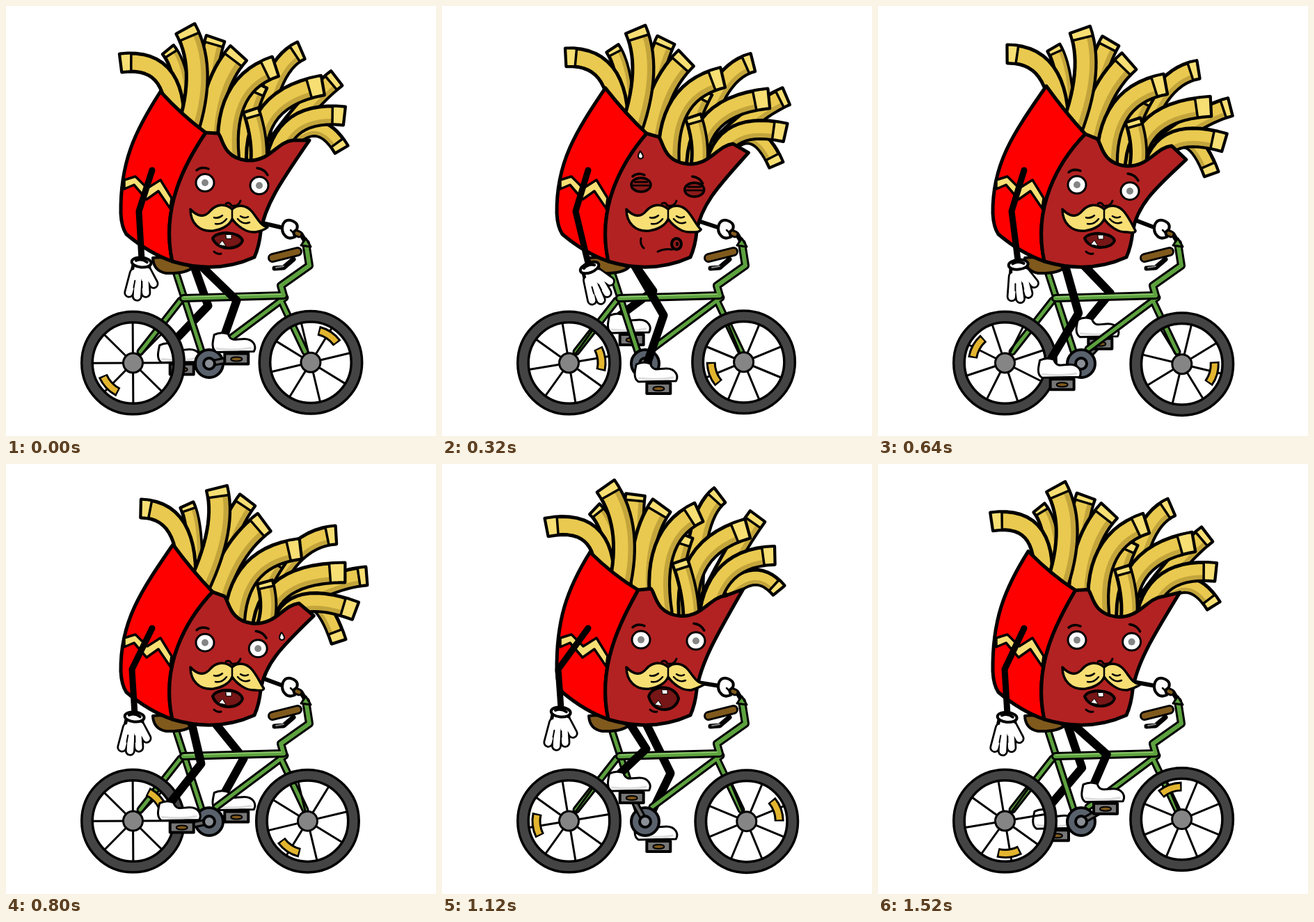
Recreate the animation shown at these times as an HTML page with a canvas. Size 618 by 618 pixels, loop 1600 ms.

```html
<!DOCTYPE html>
<html lang="en">
<head>
<meta charset="utf-8">
<title>Fries on a bike</title>
<style>
html, body { margin: 0; width: 100%; height: 100%; overflow: hidden; background: #fff; }
canvas { display: block; }
</style>
</head>
<body>
<canvas id="stage" width="618" height="618"></canvas>
<script>
const c = document.getElementById('stage').getContext('2d');
const LOOP = 1600, STEP = 80, TAU = Math.PI * 2;
const INK = '#000', GREEN = '#5da23f', BROWN = '#80591c', RED = '#f00', DARK_RED = '#b22222';
const YELLOW = '#e9c94f', PALE = '#f7df74', SHADE = '#c3a53c';

// Key poses, joined by a smooth closed curve
const KEYS = [0, 160, 480, 800, 960, 1280, 1520];
const LEAN = [0, 6, 18, 18, 5, -19, -6];
const SWAY = [0, .55, .35, 1, .13, -.85, -.05];
const WRIST = [195, 203, 213, 185, 172, 174, 186];
const MOUTH = [10, 8, 8, 11, 13, 15, 10];

function pose(values, t) {
  const n = KEYS.length;
  const x = k => KEYS[(k + n) % n] + LOOP * Math.floor(k / n);
  const y = k => values[(k + n) % n];
  const slope = k => (y(k + 1) - y(k - 1)) / (x(k + 1) - x(k - 1));
  let i = n - 1;
  while (KEYS[i] > t) i--;
  const h = x(i + 1) - x(i), u = (t - x(i)) / h, v = 1 - u;
  return v * v * (1 + 2 * u) * y(i) + u * u * (3 - 2 * u) * y(i + 1)
    + h * u * v * (v * slope(i) - u * slope(i + 1));
}

function shape(d, fill, width = 4, ink = INK) {
  const p = new Path2D(d);
  if (fill) { c.fillStyle = fill; c.fill(p); }
  if (width) { c.lineWidth = width; c.strokeStyle = ink; c.stroke(p); }
}
const line = (d, width = 4, ink = INK) => shape(d, null, width, ink);

function tube(d, color, width, edge = 3) {
  line(d, width + edge * 2);
  line(d, width, color);
}

function oval(x, y, rx, ry, fill, width = 3) {
  c.beginPath();
  c.ellipse(x, y, rx, ry, 0, 0, TAU);
  if (fill) { c.fillStyle = fill; c.fill(); }
  if (width) { c.lineWidth = width; c.strokeStyle = INK; c.stroke(); }
}

function at(x, y, angle, paint) {
  c.save();
  c.translate(x, y);
  c.rotate(angle);
  paint();
  c.restore();
}

// Back to front: base, bend, tip, tip travel at full sway, width
const FRIES = [
  [256, 165, 255, 90, 233, 63, 27, -4, 20],
  [282, 175, 288, 85, 301, 47, 46, 5, 27],
  [366, 190, 378, 84, 424, 64, 50, 38, 26],
  [412, 190, 452, 155, 482, 206, -4, 49, 21],
  [385, 205, 436, 134, 475, 104, 43, 57, 26],
  [243, 165, 243, 72, 165, 82, 29, -18, 26],
  [292, 195, 294, 112, 334, 68, 37, 16, 31],
  [263, 172, 288, 88, 258, 33, 45, 2, 30],
  [343, 232, 334, 170, 362, 112, 30, 20, 28],
  [320, 218, 310, 112, 387, 87, 36, 35, 29],
  [386, 228, 398, 148, 486, 158, 16, 53, 26],
  [360, 232, 352, 132, 455, 114, 32, 42, 28],
  [362, 232, 367, 195, 352, 150, 20, 20, 22]
];

function fry([bx, by, cx, cy, tx, ty, dx, dy, w], lean, sway) {
  const curled = tx < cx - 50;
  bx += lean * (.45 + Math.max(0, 290 - bx) * .01);
  by += lean * .35;
  cx += lean * .25 + sway * dx * .55;
  cy += lean * .15 + sway * dy * .5;
  tx += sway * dx;
  ty += sway * dy;
  const side = (u, off) => {
    const v = 1 - u;
    const gx = v * (cx - bx) + u * (tx - cx), gy = v * (cy - by) + u * (ty - cy);
    const k = off * w / Math.hypot(gx, gy);
    return [v * v * bx + 2 * u * v * cx + u * u * tx - gy * k,
            v * v * by + 2 * u * v * cy + u * u * ty + gx * k];
  };
  const band = (from, to, a, b) => {
    const left = [], right = [];
    for (let i = 0; i <= 14; i++) {
      const u = from + (to - from) * i / 14;
      left.push(side(u, a));
      right.unshift(side(u, b));
    }
    return 'M' + [...left, ...right].join('L') + 'Z';
  };
  shape(band(0, 1, -.5, .5), YELLOW, 5);
  if (!curled) shape(band(0, .9, .2, .44), SHADE, 0);
  shape(band(.9, 1, -.5, .5), PALE, 3.5);
}

function wheel(x, y, angle) {
  at(x, y, angle, () => {
    for (let i = 0; i < 8; i++) {
      const a = i * TAU / 8 - .04;
      line(`M0 0L${58 * Math.cos(a)} ${58 * Math.sin(a)}`, 3);
    }
    c.lineCap = 'butt';
    for (const [spread, width, ink] of [[.35, 14, INK], [.3, 8, '#e3b52f']]) {
      c.beginPath();
      c.arc(0, 0, 47, -spread, spread);
      c.lineWidth = width;
      c.strokeStyle = ink;
      c.stroke();
    }
    c.lineCap = 'round';
  });
  oval(x, y, 66, 66, null, 19);
  c.strokeStyle = '#444';
  c.lineWidth = 12;
  c.stroke();
  oval(x, y, 14, 14, '#858585');
}

function frame() {
  tube('M251 423L193 497M244 382L281 496M401 419L302 493M394 421L430 497', GREEN, 5);
  tube('M255 420L399 416L395 402L436 373L431 341', GREEN, 6);
  line('M256 418L395 414', 2, '#8ac569');
  tube('M383 362L419 353', BROWN, 8);
  line('M386 377L399 376L413 364', 7);
  line('M388 376L399 374', 2, '#888');
  line('M412 322L424 328L433 343', 7);
  tube('M411 324L421 328', BROWN, 5);
  shape('M424 344L431 334L438 346Z', GREEN, 3);
  shape('M211 362Q238 358 268 376Q258 385 230 384Q212 381 211 362Z', BROWN);
}

function crank(angle) {
  const x = 292 + 40 * Math.cos(angle), y = 514 + 40 * Math.sin(angle);
  tube(`M292 514L${x} ${y}`, '#666', 4);
  return [x, y];
}

function leg(hip, angle, [x, y], shift) {
  const kx = 306 + shift + 26 * Math.cos(angle), ky = 427 + 20 * Math.sin(angle);
  line(`M${hip} 374L${kx} ${ky}L${x - 17} ${y - 34}`, 12);
  at(x, y, 0, () => {
    shape('M-17 -7H17V8H-17Z', '#777', 4);
    oval(0, 1, 8, 3, BROWN, 2);
    shape('M-32 -34Q-22 -39 -12 -35C-8 -23 0 -28 11 -28C25 -28 29 -17 25 -10L-29 -9C-37 -14 -34 -25 -32 -34Z', '#fff', 3);
    line('M-28 -14Q0 -11 20 -15', 3, '#ddd');
  });
}

function box(lean) {
  const tl = [222 + lean, 123 - lean * .4];
  const tf = [287 + lean * .55, 182 + lean * .1];
  const tr = [436 + lean * .35, 193 + lean * 1.4];
  const fold = 'C222 290 258 225 ' + tf;
  const rim = (x, y) => `${x + lean * .5} ${y + lean * .4} `;
  shape(`M${tl}C${185 + lean * .6} 180 164 225 165 298Q166 318 173 328Q205 355 239 367${fold}`
    + `Q${254 + lean * .8} ${158 - lean * .2} ${tl}Z`, RED, 5);
  shape('M170 250L186 245L203 262L222 250L238 276L236 291L219 266L202 278L184 257L170 263Z', PALE, 3.5);
  shape(`M${tf}L${rim(305, 183)}C${rim(312, 190)}${rim(311, 218)}${rim(346, 222)}`
    + `C${rim(380, 224)}${rim(388, 196)}${rim(412, 193)}L${tr}`
    + `C${397 + lean * .2} ${250 + lean * .5} 372 285 366 325Q364 345 357 361Q302 386 239 367${fold}Z`, DARK_RED, 5);
}

function face(lean, open, whistling) {
  const ly = 254 + lean * .15, rx = 364 - lean * .1, ry = 258 + lean * .4;
  for (const [x, y] of [[286, ly], [rx, ry]]) {
    if (whistling) {
      oval(x, y + 1, 14, 10, '#8c1a1a', 3.5);
      line(`M${x - 12} ${y + 2}H${x + 12}M${x - 9} ${y - 3}H${x + 9}`, 2.5);
    } else {
      oval(x, y, 13, 12.5, '#fff', 3);
      oval(x, y, 5, 5, '#858585', 0);
    }
  }
  const brow = whistling ? 7 : 0;
  line(`M274 ${ly - 18 + brow}Q281 ${ly - 24 + brow} 291 ${ly - 20 + brow}`
    + `M${rx - 3} ${ry - 25 + brow}Q${rx + 7} ${ry - 24 + brow} ${rx + 12} ${ry - 15 + brow}`, 3.5);

  if (whistling) {
    oval(337, 342, 7, 8, '#8c1a1a', 4);
    oval(338, 342, 2, 3, INK, 0);
    line('M310 353Q320 348 331 350M286 334Q284 342 290 348', 3);
  } else {
    const y = 337;
    shape(`M297 ${y - 3}C302 ${y - open * 1.4} 335 ${y - open * 1.4} 340 ${y}`
      + `C336 ${y + open * 1.4} 304 ${y + open * 1.6} 297 ${y - 3}Z`, '#761616', 4);
    shape(`M316 ${y - open * .85}h8v6h-7ZM306 ${y + open * .6}l5 -6l5 8Z`, '#fff', 1);
    line('M299 353Q303 357 309 356', 3);
  }

  line('M316 284Q321 281 324 287Q334 289 337 280', 3);
  shape('M325 292C315 283 302 285 294 294C286 304 276 304 265 292C265 312 278 325 298 323C312 321 322 314 325 306'
    + `C332 316 345 326 358 325Q370 ${323 + lean * .2} ${376 - lean * .3} ${318 + lean * .25}`
    + 'C366 316 362 306 354 296C345 285 332 285 325 292Z', PALE, 3.5);
  line('M325 292V305M301 313Q310 315 317 306M333 306Q341 315 350 311M299 304Q305 306 311 301M337 302Q343 306 348 303', 2.5);
}

function drop(x, y) {
  shape(`M${x} ${y - 6}Q${x + 8} ${y + 4} ${x} ${y + 5}Q${x - 6} ${y + 3} ${x} ${y - 6}Z`, '#fff', 2);
}

function sweat(t) {
  if (t >= 160 && t < 560) drop(292 - (t - 160) * .044, 203 + (t - 160) * .072);
  if (t >= 720 && t < 1040) drop(396 - (t - 800) * .02, 248 + (t - 800) * .06);
}

function nearArm(x) {
  const y = 362 + (x - 190) * .5, elbow = Math.min(192, x - 4);
  line(`M210 236L${elbow} 295L${x} ${y}`, 9);
  at(x, y, (5 - Math.max(0, x - 195) * 1.7) * Math.PI / 180, () => {
    const fingers = 'M-9 20L-14 49M-3 22L-2 53M6 20L10 47M9 16L20 33';
    line(fingers, 15);
    shape('M-11 6L11 6L15 26Q0 34 -14 29Z', '#fff', 5);
    line(fingers, 9.5, '#fff');
    line('M-7 31L-8 41M3 31L4 40', 2);
    oval(0, 4, 14, 7, '#fff', 4);
    line('M-8 2Q0 -2 8 3', 4);
  });
}

function farHand() {
  shape('M398 314Q402 305 412 309Q421 313 418 321L413 325L415 332Q406 336 401 330Q395 324 398 314Z', '#fff', 4);
  line('M409 322L413 326', 2.5);
}

function draw(t) {
  const lean = pose(LEAN, t), sway = pose(SWAY, t);
  const turn = t / LOOP * TAU;
  const near = turn - .19, far = near + Math.PI, roll = turn * 3;
  const whistling = t >= 160 && t < 640;

  c.fillStyle = '#fff';
  c.fillRect(0, 0, 618, 618);
  c.lineCap = c.lineJoin = 'round';

  leg(286 + 16 * Math.cos(far), far, crank(far), 10);
  frame();
  wheel(182.5, 513, roll + 2.39);
  wheel(435.7 + 2.3 * Math.cos(roll - .2), 512.7 + 2.3 * Math.sin(roll - .2), roll - .98);
  oval(292, 514, 20, 20, '#59616c', 4);
  const pedal = crank(near);
  oval(292, 514, 8, 8, '#8b8f96', 4);
  leg(274 + 7 * Math.cos(near), near, pedal, 0);

  line(`M360 ${310 - lean * .3}L399 319`, 6);
  farHand();
  for (const f of FRIES) fry(f, lean, sway);
  box(lean);
  face(lean, pose(MOUTH, t), whistling);
  sweat(t);
  nearArm(pose(WRIST, t));
}

function tick() {
  draw(Math.floor(performance.now() % LOOP / STEP) * STEP);
  requestAnimationFrame(tick);
}
tick();
</script>
</body>
</html>
```
